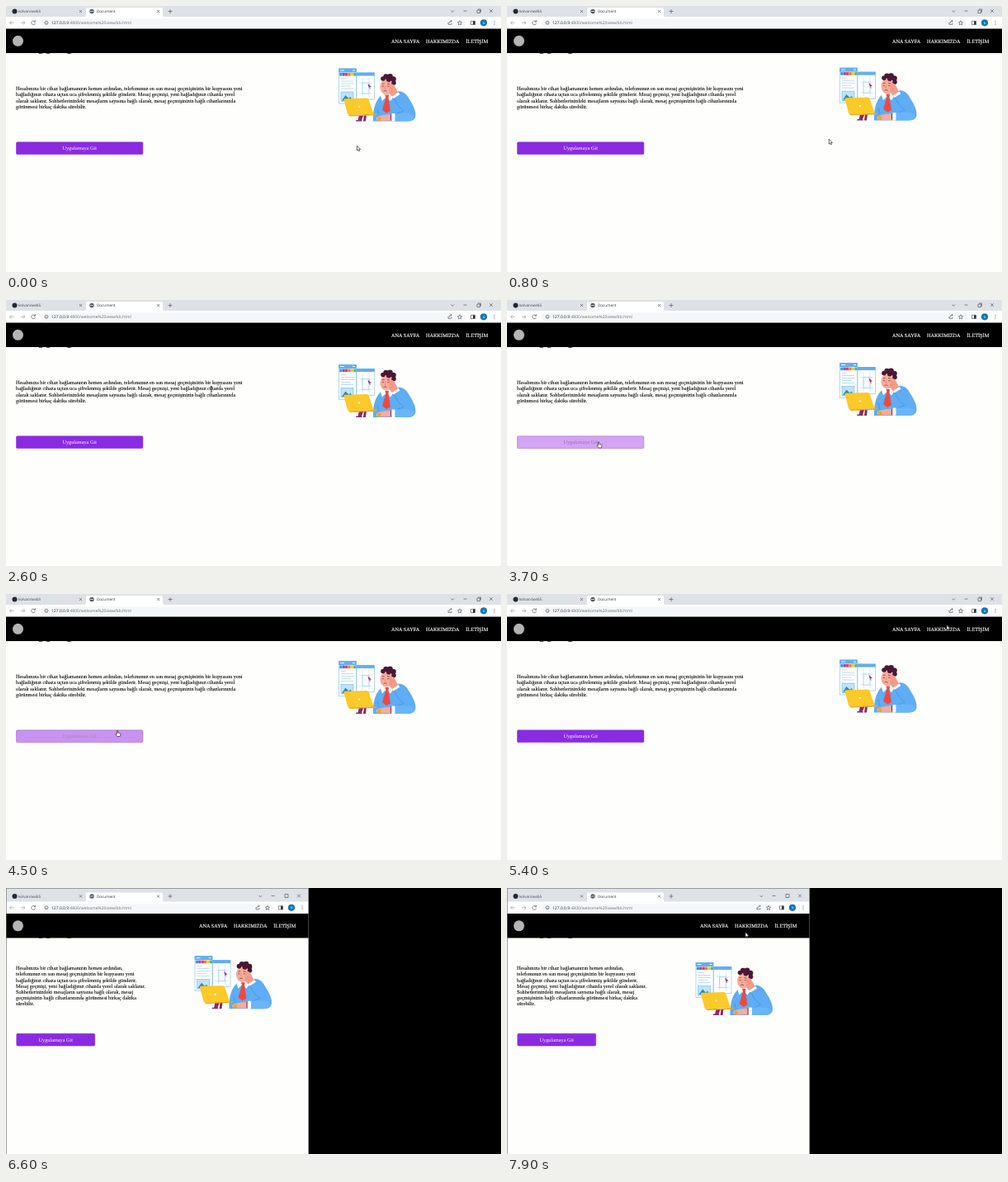
Recreate the animation shown at these times as an HTML page. Size 600x322 px, loop 8000 ms.

```html
<!DOCTYPE html>
<html lang="tr">
<head>
<meta charset="utf-8">
<title>Document</title>
<style>
html, body { margin: 0; width: 100%; height: 100%; overflow: hidden; background: #000; }
svg { display: block; width: 600px; height: 322px; text-rendering: geometricPrecision; }
.ui { font-family: "Open Sans", "Noto Sans", sans-serif; }
.page { font: 6.25px "Liberation Serif", "Times New Roman", serif; }
.page .nav { fill: #fff; stroke: #fff; stroke-width: .12; }
.page .copy { stroke: #000; stroke-width: .08; }
.line { fill: none; stroke: #555a60; stroke-width: .7; }
</style>
</head>
<body>
<svg viewBox="0 0 600 322">
  <g id="full"></g>
  <g id="small"></g>

  <g id="art">
    <!-- two web pages -->
    <rect x="425" y="81" width="21.500" height="32" fill="#fff" stroke="#7dbaf0" stroke-width=".6"/>
    <rect x="424.700" y="80.500" width="22" height="4" fill="#62aef3"/>
    <path d="M428 93h16M428 106h16M432 87v23M440 87v23" stroke="#bcd9f3" stroke-width=".6"/>
    <path d="M432 93h8v13h-8z" fill="#f4f9fe" stroke="#7dbaf0" stroke-width=".5"/>
    <path d="M438.500 94l4.500 4-2 .2-.6 2z" fill="#8b2b68"/>
    <path d="M440.300 98l1.400 2.600" stroke="#f2793c" stroke-width=".9"/>
    <rect x="403.500" y="76" width="21" height="42" fill="#fff" stroke="#7dbaf0" stroke-width=".6"/>
    <rect x="403.200" y="75.500" width="21.600" height="5" fill="#62aef3"/>
    <path d="M405 78h5M420 78h3" stroke="#fff" stroke-width=".9"/>
    <g id="swatches"></g>
    <path d="M406 88h6M406 91h15M406 94h16M406 97h12M406 100h15" stroke="#b4d6f3" stroke-width=".9"/>
    <rect x="406" y="104" width="15" height="11.500" fill="#bfe3fb" stroke="#5aa9ee" stroke-width=".5"/>
    <path d="M407 114.500l4.500-6.500 4 4 2-2 3 4.500z" fill="#2f8ab0"/>

    <!-- man -->
    <path d="M445 139.500Q444 116 457 106L470 109L476 103Q484 103 489 113Q497 125 496.500 133Q496 139.500 487 139.500Z" fill="#5eadf5"/>
    <path d="M453 106L455 103H467L470 109L466 115L461 110L456 115Z" fill="#fff"/>
    <path d="M459.500 107.500L464 107.500L463.500 111L466 127L461 129.500L456 125.500L460.500 111Z" fill="#ec4a40"/>
    <ellipse cx="461" cy="98" rx="7.600" ry="9.300" fill="#f8ac9a"/>
    <g fill="#4b1735">
      <circle cx="457" cy="88" r="2.800"/><circle cx="460.500" cy="85.500" r="3.200"/>
      <circle cx="465.500" cy="85.500" r="3.400"/><circle cx="469.500" cy="88.500" r="3.300"/>
      <circle cx="470" cy="93" r="2.800"/><circle cx="464" cy="89" r="3"/>
    </g>
    <path d="M456 94.500l2.700-.6M462 94l3 .7M457.500 103q2-1.300 4 .2M455.800 97.200h2.200M462.200 97.200h2.400" fill="none" stroke="#4b1735" stroke-width=".6"/>
    <path d="M460 96.500l-1.200 3.400 1.600.2" fill="none" stroke="#d9705f" stroke-width=".5"/>
    <path d="M465 96Q469 92.500 471 97L476 106L469 111L464 105Z" fill="#f49c89"/>
    <path d="M466 99l3 3M465 102l3 2" stroke="#d9705f" stroke-width=".4"/>
    <path d="M468 109.500L475.500 104.500L477.500 107L469.500 112Z" fill="#fff"/>
    <path d="M470 112Q475 122 482 127L474 130M450 124L452 132" fill="none" stroke="#3f8fe0" stroke-width=".7"/>
    <path d="M471 130H488Q495 131 495 135Q494 139.500 487 139.500H471Z" fill="#69b5f8"/>
    <path d="M470 131Q458 131 450 134Q446.500 137 451 138.800H470Z" fill="#f8ac9a"/>
    <rect x="467.500" y="130" width="4" height="9.500" rx="1" fill="#fff"/>
    <path d="M466.500 131v7.500" stroke="#8b2b68" stroke-width="1"/>
    <path d="M450 134.500h4.500l-.6 4.500h-3.300z" fill="#e4a91f"/>

    <!-- laptop -->
    <path d="M428 132h5.500l-2.500 6 1 1.500h-8l.6-1.500h2zM434 132h3l-1 7.500h-3z" fill="#8b2b68"/>
    <path d="M411 112.200L437 111.500Q439 111.500 439.600 113L445.500 130.500L416 132Q414.500 132 414 130.500L409.500 113.500Q409.500 112.200 411 112.200Z" fill="#fbca28"/>
    <circle cx="428" cy="122" r="1.300" fill="#fff3c4"/>
    <path d="M415 132L449 130.500V132.200L417 133.500Z" fill="#e4a91f"/>
  </g>

  <g id="cursor">
    <path id="arrow" d="M0 0V6L1.400 4.800 2.300 6.800 3.200 6.400 2.400 4.500H4.200Z" fill="#fff" stroke="#111" stroke-width=".6"/>
    <path id="beam" d="M-1.300 0H1.300M0 0V6M-1.300 6H1.300" fill="none" stroke="#111" stroke-width=".7"/>
    <path id="hand" d="M0 0Q.7-.7 1.300 0V2.500L4 3.200Q4.600 3.500 4.400 4.500L3.800 7H.5L-1.600 4.200Q-1.400 3.200-.4 3.900L0 4.200Z" fill="#fff" stroke="#111" stroke-width=".6"/>
  </g>
</svg>

<script>
const $ = id => document.getElementById(id);
const LOOP = 8000, SNAP = 6400;

const text = (x, y, str, more = "") => `<text x="${x}" y="${y}" ${more}>${str}</text>`;
const rect = (x, y, w, h, fill, r = 0) =>
  `<rect x="${x}" y="${y}" width="${w}" height="${h}" rx="${r}" fill="${fill}"/>`;
const dot = (x, y, r, fill) => `<circle cx="${x}" cy="${y}" r="${r}" fill="${fill}"/>`;
const stroke = (d, more = "") => `<path class="line" d="${d}" ${more}/>`;
const cross = (x, y, r) => stroke(`M${x - r} ${y - r}l${2 * r} ${2 * r}m0 ${-2 * r}l${-2 * r} ${2 * r}`);

function browser(w, top, maximized) {
  const tabY = 6.5 + top, barY = 20.3 + top;
  const sizeIcon = maximized
    ? `M${w - 29} ${tabY - 1.5}h3.500v3.500h-3.500zM${w - 28} ${tabY - 2.5}h3.500v3.500`
    : `M${w - 29} ${tabY - 2.5}h4v4h-4z`;
  return `<g class="ui">` +
    rect(0, 0, w, 14 + top, "#dee1e6") +
    `<path d="M95 ${13 + top}q2 0 2-2v-7q0-2 2-2h89q2 0 2 2v7q0 2 2 2z" fill="#fff"/>` +
    rect(0, 13 + top, w, 15, "#fff") +
    dot(10.5, tabY, 3, "#24292f") +
    text(15, tabY + 1.7, "kolvan/web5", `font-size="4.600" fill="#45494d"`) +
    cross(90.5, tabY, 1.5) +
    dot(104, tabY, 2.7, "#55595e") +
    stroke(`M102 ${tabY}h4`, `style="stroke:#fff"`) +
    text(110, tabY + 1.7, "Document", `font-size="4.600" fill="#333"`) +
    cross(184.5, tabY, 1.5) +
    stroke(`M196.500 ${tabY}h5M199 ${tabY - 2.5}v5`) +
    // window controls
    stroke(`M${w - 60.5} ${tabY - 1}l1.800 1.800 1.800-1.800M${w - 45.5} ${tabY - .5}h4` + sizeIcon) +
    cross(w - 12, tabY - .5, 1.8) +
    // toolbar
    `<g opacity=".6">` + stroke(`M9.500 ${barY}h-5m2.300-2.300l-2.300 2.300 2.300 2.300`) +
    stroke(`M18 ${barY}h5m-2.300-2.300l2.300 2.300-2.300 2.300`) + `</g>` +
    stroke(`M35 ${barY - 1.5}a2.400 2.400 0 1 0 .5 2.200M35.500 ${barY - 3}v2h-2`) +
    rect(42, 15.2 + top, w - 85, 10.2, "#f5f6f8", 5.1) +
    `<circle class="line" cx="49" cy="${barY}" r="2"/>` + stroke(`M49 ${barY - .3}v1.400`) +
    text(55, barY + 1.8, `127.0.0.9<tspan fill="#6a6e73">:4800/welcome%20view/bb.html</tspan>`,
      `font-size="5" fill="#222"`) +
    stroke(`M${w - 64} ${barY - .5}v2.500h4v-1.500m-3 0q0-2.500 3-2.500m-1-1.300l1.300 1.300-1.300 1.200`) +
    stroke(`M${w - 50} ${barY - 2.5}l.8 1.700 1.800.2-1.300 1.300.3 1.800-1.600-.9-1.600.9.3-1.800-1.300-1.300 1.800-.2z`) +
    stroke(`M${w - 36.5} ${barY - 2}h5v4.200h-5z`) + rect(w - 34, barY - 2, 2.5, 4.2, "#33373c") +
    dot(w - 21, barY, 4.1, "#1276bb") +
    text(w - 21, barY + 1.3, "N", `font-size="3.600" fill="#fff" text-anchor="middle"`) +
    [-2, 0, 2].map(d => dot(w - 8, barY + d, .55, "#555a60")).join("") + `</g>`;
}

function scene(id, { w, top, maximized, header, textY, btn, lines }) {
  $(id).innerHTML = rect(0, 0, w, 322, "#fefefd") + browser(w, top, maximized) +
    `<g class="page">` +
    text(12, 53.7 + top, "Shopping", `font-size="17" font-weight="bold"`) +
    rect(0, 27.5 + top, w, header, "#000") +
    dot(14.5, 42.3 + top, 6.5, "#b4b4b4") +
    [["ANA SAYFA", 133], ["HAKKIMIZDA", 91], ["İLETİŞİM", 42.5]]
      .map(([s, right]) => text(w - right, 44.8 + top, s, `class="nav"`)).join("") +
    lines.map((s, i) => text(12, textY + i * 7.19, s, `class="copy"`)).join("") +
    `<rect class="btn" x="${btn.x}" y="${btn.y}" width="${btn.w}" height="14.800" rx="1.400" stroke-width=".6"/>` +
    text(btn.x + btn.w / 2, btn.y + 9.5, "Uygulamaya Git", `class="label" text-anchor="middle"`) + `</g>` +
    (maximized ? "" : `<rect x=".3" y=".3" width="${w - .6}" height="322" fill="none" stroke="#6b6e72" stroke-width=".6"/>`);
}

scene("full", {
  w: 600, top: 0, maximized: true, header: 29.5, textY: 102.2, btn: { x: 12.5, y: 164.8, w: 153.4 },
  lines: [
    "Hesabınıza bir cihaz bağlamanızın hemen ardından, telefonunuz en son mesaj geçmişinizin bir kopyasını yeni",
    "bağladığınız cihaza uçtan uca şifrelenmiş şekilde gönderir. Mesaj geçmişi, yeni bağladığınız cihazda yerel",
    "olarak saklanır. Sohbetlerinizdeki mesajların sayısına bağlı olarak, mesaj geçmişinizin bağlı cihazlarınızda",
    "görünmesi birkaç dakika sürebilir."]
});
scene("small", {
  w: 367, top: 3.5, maximized: false, header: 29.5, textY: 99.2, btn: { x: 12.8, y: 176.3, w: 94.9 },
  lines: [
    "Hesabınıza bir cihaz bağlamanızın hemen ardından,",
    "telefonunuz en son mesaj geçmişinizin bir kopyasını yeni",
    "bağladığınız cihaza uçtan uca şifrelenmiş şekilde gönderir.",
    "Mesaj geçmişi, yeni bağladığınız cihazda yerel olarak saklanır.",
    "Sohbetlerinizdeki mesajların sayısına bağlı olarak, mesaj",
    "geçmişinizin bağlı cihazlarınızda görünmesi birkaç dakika",
    "sürebilir."]
});
$("swatches").innerHTML = ["#4a8fe0", "#7a58c9", "#e8443e", "#f2793c", "#fbc926", "#4fb58a"]
  .map((c, i) => rect(404.3 + i * 3.4, 81, 3.2, 3.6, c)).join("");

// Interpolates rows of [time, ...values].
function track(rows, t, ease = k => k) {
  let i = 0;
  while (i < rows.length - 2 && t >= rows[i + 1][0]) i++;
  const a = rows[i], b = rows[i + 1];
  const k = ease(Math.min(1, Math.max(0, (t - a[0]) / (b[0] - a[0]))));
  return a.slice(1).map((v, j) => v + (b[j + 1] - v) * k);
}
const smooth = k => k * k * (3 - 2 * k);

const path = [[0, 425.5, 169], [500, 418, 167], [900, 385, 160], [1400, 258, 97], [1800, 255, 99],
  [2600, 249, 105], [2800, 249, 106], [3300, 128, 170], [3700, 110.5, 172], [4400, 111, 173],
  [5100, 533, 37.5], [5500, 533, 37.5], [6000, 573, 5], [6400, 573, 5],
  [7000, 430, 25], [7250, 343, 43], [7900, 289, 53.5]];
const bobPhase = [[0, -60], [1000, 70], [1500, 139], [2600, 263], [3700, 428], [5400, 600], [6600, 735], [7900, 895]];
const hover = [[3300, 0], [3600, 1], [4450, 1], [4800, 0]];
const mix = (a, b, k) => `rgb(${a.map((v, i) => Math.round(v + (b[i] - v) * k))})`;
const show = (id, on) => $(id).style.display = on ? "" : "none";

function draw(t) {
  const small = t >= SNAP;
  show("full", !small);
  show("small", small);

  const bob = 2 - 4 * Math.cos(track(bobPhase, t)[0] * Math.PI / 180);
  $("art").setAttribute("transform", `translate(${small ? -174.5 : 0} ${bob + (small ? 8.5 : 0)})`);

  const k = track(hover, t)[0];
  for (const b of document.querySelectorAll(".btn")) {
    b.style.fill = mix([138, 43, 226], [211, 163, 244], k);
    b.style.stroke = mix([138, 43, 226], [160, 115, 190], k);
  }
  for (const l of document.querySelectorAll(".label")) l.style.fill = mix([255, 255, 255], [145, 115, 165], k);

  const [x, y] = track(path, t, smooth);
  const beam = !small && x < 288 && y > 92 && y < 122;
  const hand = !small && x > 12 && x < 166 && y > 164 && y < 180;
  show("cursor", !small || t >= 7000);
  show("beam", beam);
  show("hand", hand);
  show("arrow", !beam && !hand);
  $("cursor").setAttribute("transform", `translate(${x} ${y})`);
}

const start = performance.now();
function tick() {
  const t = Math.max(0, performance.now() - start) % LOOP;
  draw(Math.floor(t / 100) * 100);
  requestAnimationFrame(tick);
}
tick();
</script>
</body>
</html>
```
